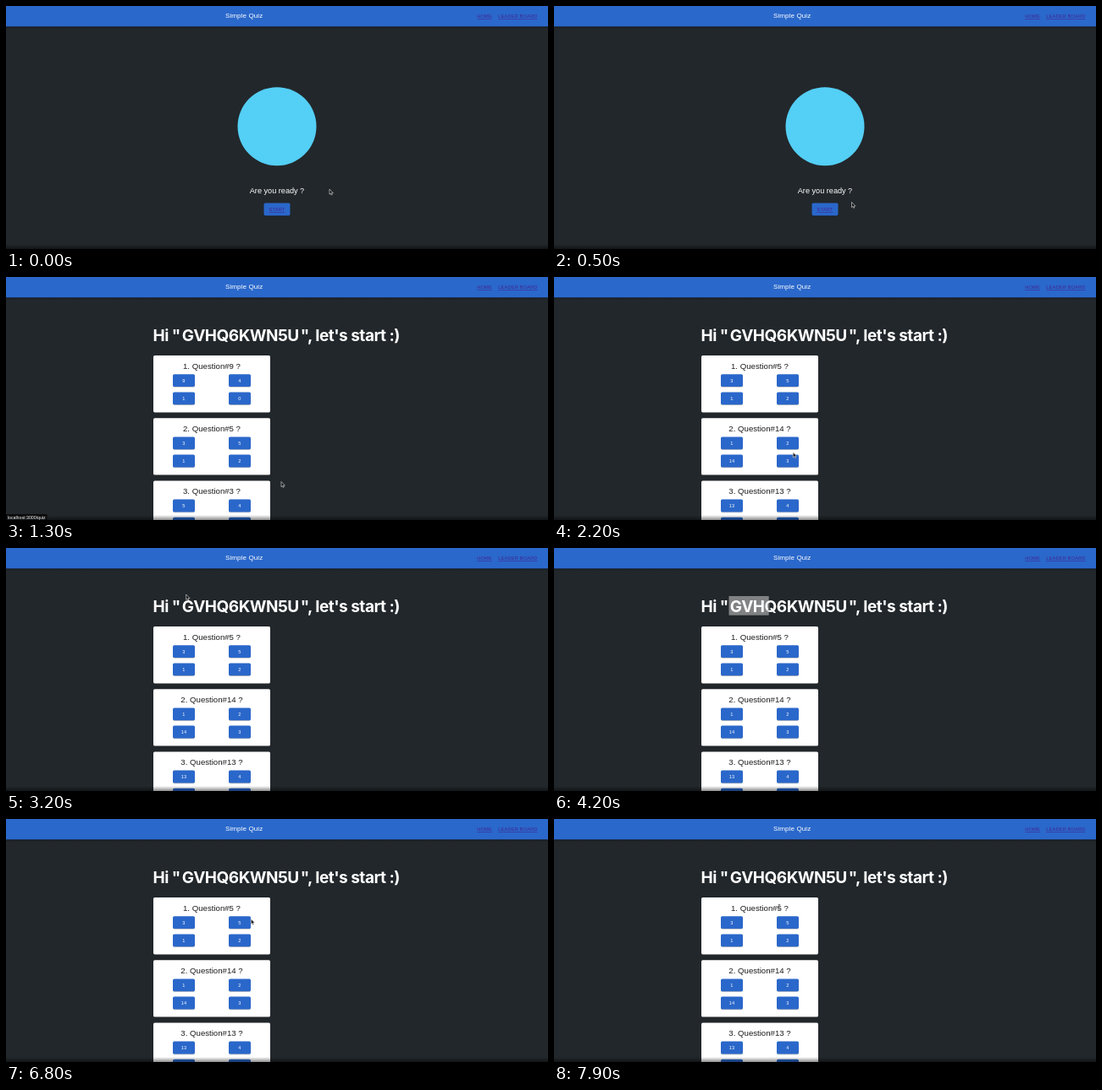
An HTML page that plays this animation: 640 px wide and 288 px high, repeating every 8 s.

```html
<!DOCTYPE html>
<html lang="en">
<head>
<meta charset="utf-8">
<title>Simple Quiz</title>
<style>
  html, body { margin: 0; width: 100%; height: 100%; overflow: hidden; background: #22272b; }
  svg { display: block; width: 100vw; height: 100vh; }
  text { font-family: "Liberation Sans", Arial, sans-serif; fill: #fff; white-space: pre; }
  .mid { text-anchor: middle; }
  .end { text-anchor: end; }
  .title { font-size: 8.1px; letter-spacing: .06px; }
  .ready { font-size: 9.15px; }
  .ask { font-size: 9.65px; fill: #1c1c1c; }
  .label { font-size: 5.67px; letter-spacing: .16px; }
  .link { fill: #43248f; text-decoration: underline; text-decoration-thickness: .5px; }
  .hello { font: 700 19px Inter, sans-serif; letter-spacing: -.5px; }
  .status { font-size: 5.26px; }
  .btn { fill: #2a67ca; }
</style>
</head>
<body>
<svg viewBox="0 0 640 288" preserveAspectRatio="none">
  <defs>
    <linearGradient id="drop" x2="0" y2="1">
      <stop stop-color="#000" stop-opacity=".4"/>
      <stop offset="1" stop-color="#000" stop-opacity="0"/>
    </linearGradient>
    <linearGradient id="edge" x2="0" y2="1">
      <stop stop-color="#000" stop-opacity="0"/>
      <stop offset="1" stop-color="#000" stop-opacity=".45"/>
    </linearGradient>
  </defs>

  <rect width="640" height="288" fill="#22272b"/>

  <g id="home">
    <circle cx="320" cy="142.7" r="46.5" fill="#54cff5"/>
    <text class="ready mid" x="320" y="222">Are you ready ?</text>
    <rect x="304.5" y="234.4" width="31" height="15" rx="1.8" opacity=".3"/>
    <rect id="start" class="btn" x="304.5" y="233.6" width="31" height="14.8" rx="1.7"/>
    <text class="label link mid" x="320" y="243">START</text>
  </g>

  <g id="quiz">
    <rect id="select" x="206.5" y="57" height="22.7" fill="#808284"/>
    <text class="hello" x="173.5" y="75.7">Hi "</text>
    <text class="hello mid" x="276.8" y="75.7">GVHQ6KWN5U</text>
    <text class="hello end" x="465" y="75.7">", let's start :)</text>
    <g id="first"></g>
    <g id="second"></g>
  </g>

  <rect y="24" width="640" height="3" fill="url(#drop)"/>
  <rect width="640" height="24.3" fill="#2a68cb"/>
  <text class="title" x="259" y="14.2">Simple Quiz</text>
  <text class="label link" x="556.3" y="14">HOME</text>
  <text class="label link" x="581.3" y="14">LEADER BOARD</text>
  <rect y="282" width="640" height="6" fill="url(#edge)"/>

  <g id="status">
    <rect y="281" width="48.5" height="7" fill="#0c0d0e"/>
    <text class="status" x="1.8" y="286.7">localhost:3000/quiz</text>
  </g>

  <g id="cursor" stroke-linejoin="round">
    <path id="arrow" d="M0 0V6.2L1.4 5 2.3 7 3.3 6.5 2.4 4.6H4.3Z" fill="#111" stroke="#e8e8e8" stroke-width=".6"/>
    <path id="hand" d="M-.8 .2Q0-.6 .6 .2V2.2L3 2.8Q3.7 3 3.5 4L2.9 6.5H-.4L-2.2 3.9Q-1.9 3-.8 3.8Z" fill="#fff" stroke="#111" stroke-width=".5"/>
    <g id="beam" fill="none">
      <path d="M-1.3-3.6Q0-3.6 0-2.8V2.8Q0 3.6-1.3 3.6M1.3-3.6Q0-3.6 0-2.8M0 2.8Q0 3.6 1.3 3.6" stroke="#ddd" stroke-opacity=".7" stroke-width="1.2"/>
      <path d="M-1.3-3.6Q0-3.6 0-2.8V2.8Q0 3.6-1.3 3.6M1.3-3.6Q0-3.6 0-2.8M0 2.8Q0 3.6 1.3 3.6" stroke="#222" stroke-width=".6"/>
    </g>
  </g>
</svg>

<script>
const LOOP = 8000, STEP = 100;
const $ = id => document.getElementById(id);
const show = (id, on) => { $(id).style.display = on ? "" : "none"; };

function add(parent, tag, attrs, text) {
  const el = document.createElementNS("http://www.w3.org/2000/svg", tag);
  for (const key in attrs) el.setAttribute(key, attrs[key]);
  if (text !== undefined) el.textContent = text;
  parent.append(el);
}

// Each card: question number, then its four answers
const firstSet = [[9, 9, 4, 1, 0], [5, 3, 5, 1, 2], [3, 5, 4, 1, 3]];
const secondSet = [[5, 3, 5, 1, 2], [14, 1, 2, 14, 3], [13, 13, 4, 1, 2]];

function drawCards(parent, cards) {
  cards.forEach(([number, ...answers], i) => {
    const y = 93 + i * 74.2;
    add(parent, "rect", { x: 174, y, width: 138, height: 67.4, rx: 1.7, fill: "#fff" });
    add(parent, "text", { class: "ask mid", x: 243, y: y + 15.8 }, `${i + 1}. Question#${number} ?`);
    answers.forEach((answer, k) => {
      const x = 197 + (k % 2) * 66, top = y + 22.2 + (k >> 1) * 21.2;
      add(parent, "rect", { x, y: top + .8, width: 26, height: 14.8, rx: 1.8, opacity: .25 });
      add(parent, "rect", { class: "btn", x, y: top, width: 26, height: 14.8, rx: 1.7 });
      add(parent, "text", { class: "label mid", x: x + 13, y: top + 9.4 }, answer);
    });
  });
}
drawCards($("first"), firstSet);
drawCards($("second"), secondSet);

// time, x, y
const path = [
  [0, 382, 217], [300, 370, 224], [700, 333, 241], [900, 325, 242.5], [1900, 325, 242.5],
  [2300, 268, 196], [2700, 192, 132], [2800, 206, 121], [3200, 212.7, 55],
  [3500, 211, 69], [3700, 210, 69], [3900, 208, 69], [4800, 345, 72], [5000, 343.7, 72],
  [5500, 343.7, 72], [6000, 361, 124], [6400, 361, 124], [6800, 289.3, 118.5],
  [7200, 252, 98], [7500, 222, 67], [7600, 223, 68], [7900, 266, 105]
];
const shapes = [[0, "arrow"], [800, "hand"], [1200, "arrow"], [3400, "beam"],
  [5700, "arrow"], [7300, "beam"]];
const fades = [[700, 0], [900, .4], [1000, 1], [1400, 1], [1700, 0]];

// Linear value of one column of a timed table
function at(table, t, col = 1) {
  const i = table.findIndex(row => row[0] > t);
  if (i < 0) return table[table.length - 1][col];
  if (i === 0) return table[0][col];
  const a = table[i - 1], b = table[i];
  return a[col] + (b[col] - a[col]) * (t - a[0]) / (b[0] - a[0]);
}

function draw(t) {
  const x = at(path, t), y = at(path, t, 2);
  $("cursor").setAttribute("transform", `translate(${x} ${y})`);
  const shape = shapes.filter(s => s[0] <= t).pop()[1];
  for (const id of ["arrow", "hand", "beam"]) show(id, id === shape);

  show("home", t < 1100);
  show("quiz", t >= 1100);
  show("first", t < 1500);
  show("second", t >= 1500);
  $("start").style.fill = t >= 700 ? "#2159b3" : "";
  $("status").style.opacity = at(fades, t);

  const selecting = t >= 4000 && t < 6300;
  show("select", selecting);
  const end = t < 4800 ? Math.min(x, 347.5) : 347.5;
  $("select").setAttribute("width", Math.max(0, end - 206.5));
}

const begin = performance.now();
function tick() {
  const t = Math.max(0, performance.now() - begin) % LOOP;
  draw(Math.floor(t / STEP) * STEP);
  requestAnimationFrame(tick);
}
draw(0);
tick();
</script>
</body>
</html>
```
